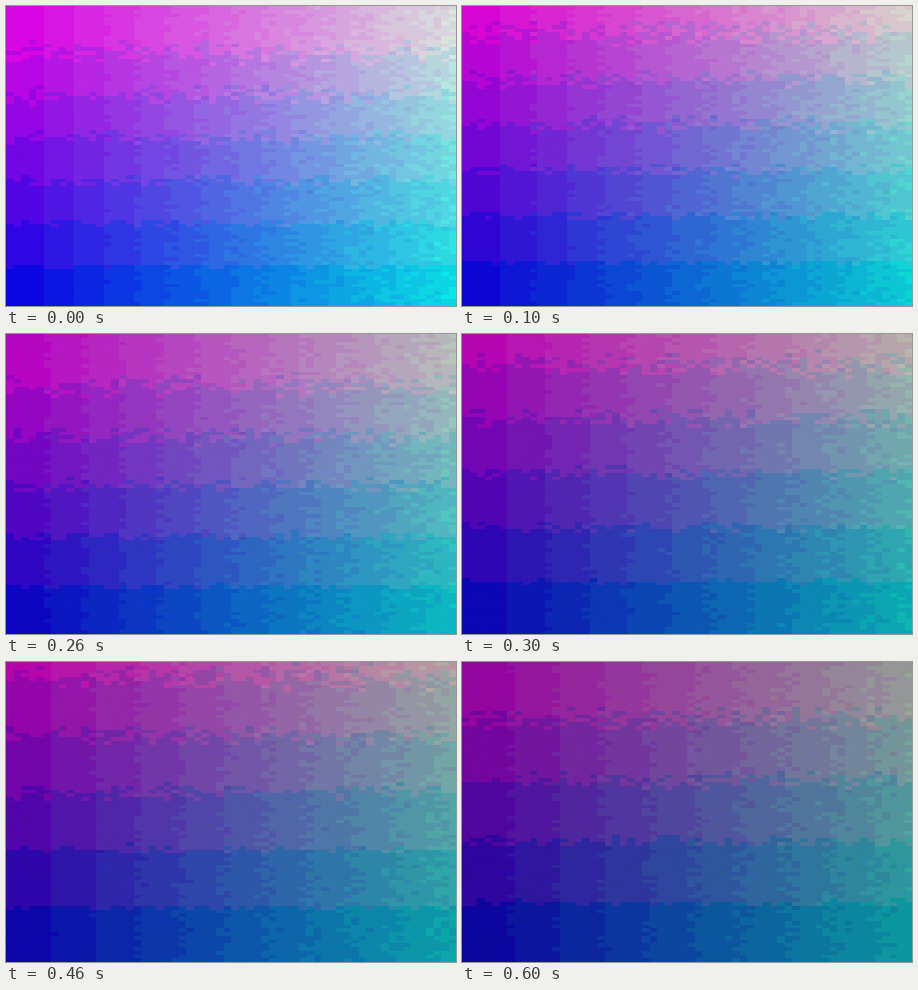
Recreate the animation shown at these times as an HTML page with a canvas. Size 450 by 300 pixels, loop 0.7 s.

```html
<!DOCTYPE html>
<html lang="en">
<head>
<meta charset="utf-8">
<title>Fading mosaic</title>
<style>
  html, body { margin: 0; width: 100%; height: 100%; overflow: hidden; background: #00d; }
  canvas { display: block; width: 450px; height: 300px; }
</style>
</head>
<body>
<canvas id="stage" width="450" height="300"></canvas>
<script>
const ctx = document.getElementById("stage").getContext("2d");
const COLS = 60, ROWS = 80, CELL_W = 7.5, CELL_H = 3.75;
const STEP_MS = 100;
const JITTER = 0.05;
const RED_BAND = 32, GREEN_BAND = 16;

// Brightness of each step, and how much the blue channel flickers.
const steps = [
  { level: 226, flicker: 3 },
  { level: 210, flicker: 2 },
  { level: 192, flicker: 7 },
  { level: 177, flicker: 3 },
  { level: 168, flicker: 7 },
  { level: 164, flicker: 10 },
  { level: 157, flicker: 8 }
];

function seededRandom(seed) {
  return () => {
    seed = (seed + 0x6D2B79F5) | 0;
    let t = Math.imul(seed ^ (seed >>> 15), 1 | seed);
    t = (t + Math.imul(t ^ (t >>> 7), 61 | t)) ^ t;
    return ((t ^ (t >>> 14)) >>> 0) / 4294967296;
  };
}

function draw(index) {
  const { level, flicker } = steps[index];
  const random = seededRandom(977 * (index + 1));
  const jitter = () => 1 + (random() * 2 - 1) * JITTER;
  const topBand = Math.floor(level / RED_BAND - 0.2);

  for (let row = 0; row < ROWS; row++) {
    const top = Math.round(row * CELL_H);
    const bottom = Math.round((row + 1) * CELL_H);
    const up = 1 - row / ROWS;
    for (let col = 0; col < COLS; col++) {
      const left = Math.round(col * CELL_W);
      const right = Math.round((col + 1) * CELL_W);
      const across = col / COLS;

      // Red falls in coarse bands, green rises in bands half as deep.
      const redBand = Math.min(topBand, Math.floor(level * up * jitter() / RED_BAND));
      const greenBand = Math.floor(level * across * jitter() / GREEN_BAND);
      const r = redBand * 34 + 12;
      const g = greenBand * GREEN_BAND + 6;
      const b = level + 2 - 8 * across * up + (random() - 0.5) * flicker;

      ctx.fillStyle = `rgb(${r}, ${g}, ${Math.round(b)})`;
      ctx.fillRect(left, top, right - left, bottom - top);
    }
  }
}

let shown = -1;
const start = performance.now();

function tick() {
  const time = performance.now() - start;
  const index = Math.floor(time / STEP_MS) % steps.length;
  if (index !== shown) {
    draw(index);
    shown = index;
  }
  requestAnimationFrame(tick);
}
tick();
</script>
</body>
</html>
```
